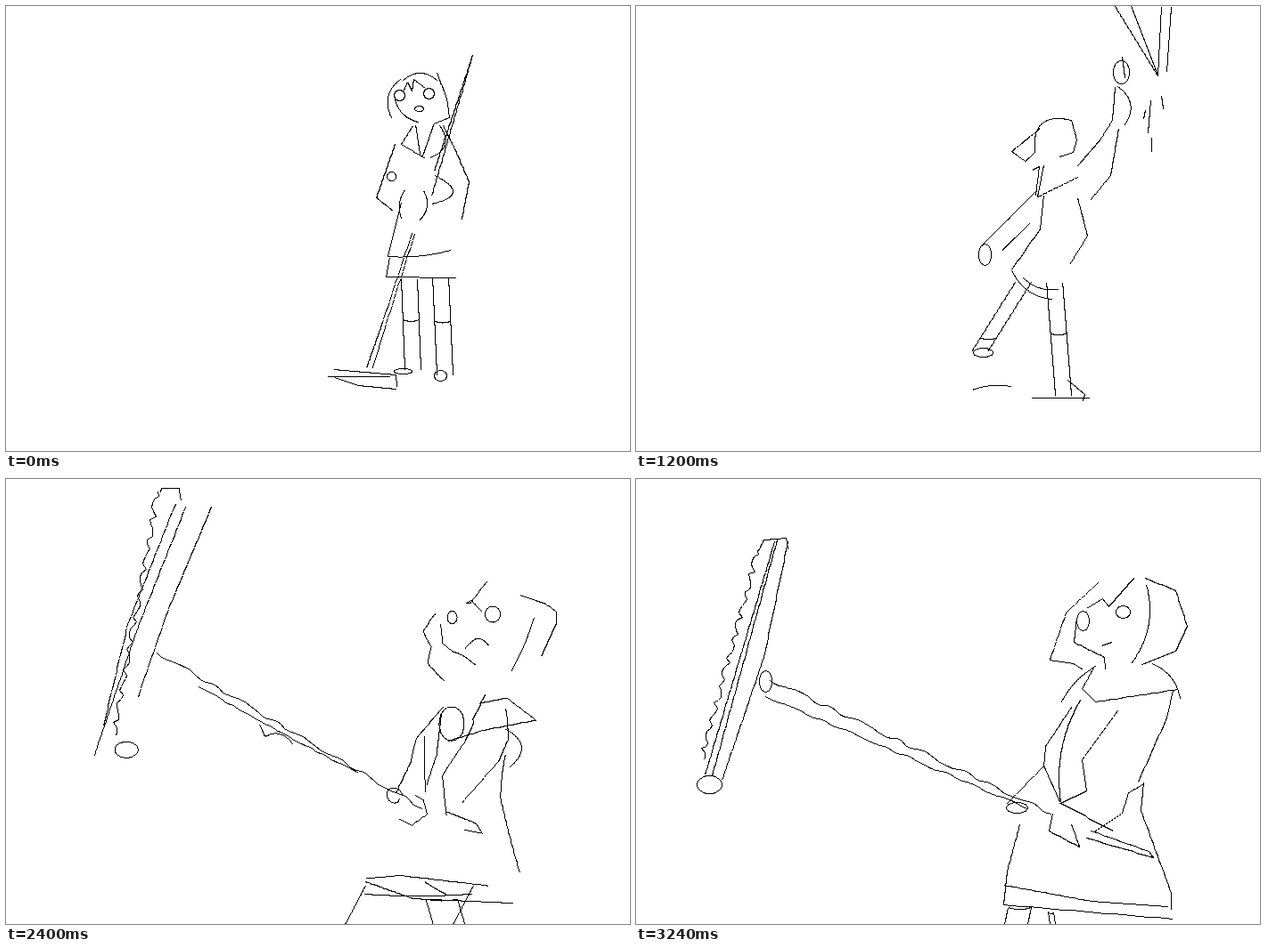
An HTML page for the animation above (3.36 s loop, 700x500 px).

```html
<!DOCTYPE html>
<html lang="en">
<head>
<meta charset="utf-8">
<title>Rake swing</title>
<style>
  html, body { margin: 0; width: 100%; height: 100%; overflow: hidden; background: #fff; }
  svg { display: block; width: 700px; height: 500px; }
  path { fill: none; stroke: #000; stroke-width: 1; shape-rendering: crispEdges; }
</style>
</head>
<body>
<svg viewBox="0 0 700 500"><path id="ink" transform="translate(.5 .5)"/></svg>
<script>
const LOOP = 3360, STEP = 120, MARK_REACH = 130;
const SEGMENTS = 60; // every stroke has the same number of points, so any two can blend

const mix = (a, b, k) => a + (b - a) * k;
const mixPoint = (p, q, k) => [mix(p[0], q[0], k), mix(p[1], q[1], k)];
const trace = at => Array.from({ length: SEGMENTS + 1 }, (_, i) => at(i / SEGMENTS, i));

function line(...xy) {
  const last = xy.length / 2 - 1;
  const point = i => [xy[2 * i], xy[2 * i + 1]];
  return trace(t => {
    const i = Math.min(last - 1, Math.floor(t * last));
    return mixPoint(point(i), point(i + 1), t * last - i);
  });
}

// Straight stroke pushed sideways by offset(t, i).
function pushed(ax, ay, bx, by, offset) {
  const length = Math.hypot(bx - ax, by - ay);
  return trace((t, i) => {
    const d = offset(t, i) / length;
    return [mix(ax, bx, t) + d * (by - ay), mix(ay, by, t) - d * (bx - ax)];
  });
}
const bow = (ax, ay, bx, by, bulge) => pushed(ax, ay, bx, by, t => bulge * 4 * t * (1 - t));
const wavy = (ax, ay, bx, by, size) => pushed(ax, ay, bx, by, (t, i) => size * Math.sin(i * 0.9 + Math.sin(i * 0.4)));
const teeth = (ax, ay, bx, by) => pushed(ax, ay, bx, by, (t, i) => 3 * Math.sin(i * 1.4 + Math.sin(i)) - 1);
const ring = (x, y, rx, ry = rx) => trace(t => [x + rx * Math.cos(t * 2 * Math.PI), y + ry * Math.sin(t * 2 * Math.PI)]);

function star(x, y, ...tips) {
  const outline = [];
  for (let i = 0; i < 8; i += 2) {
    const [ax, ay, bx, by] = [0, 1, 2, 3].map(k => tips[(i + k) % 8]);
    outline.push(ax, ay, x + 0.11 * (ax + bx - 2 * x), y + 0.11 * (ay + by - 2 * y));
  }
  return line(...outline, tips[0], tips[1]);
}

function leg(ax, ay, bx, by, width, knee = 0.45, bulge = 0) {
  const left = bow(ax, ay, bx, by, bulge);
  const [x, y] = left[Math.round(knee * SEGMENTS)];
  return [left, bow(ax + width, ay, bx + width, by, bulge), bow(x, y, x + width, y, -2)];
}

const resting = {
  hair: [bow(442, 82, 432, 125, -9), bow(444, 84, 484, 84, 9), line(483, 75, 494, 103, 497, 125, 479, 132), line(446, 94, 450, 85, 455, 95, 457, 82, 470, 92)],
  face: [bow(435, 99, 462, 130, -7), ring(441, 100, 6), ring(474, 98, 6), ring(463, 115, 5, 3)],
  body: [line(443, 220, 428, 280), line(459, 133, 464, 166), line(480, 131, 467, 168), line(456, 134, 443, 155, 470, 171), bow(486, 134, 475, 170, 12)],
  armL: [line(436, 155, 415, 215, 433, 229), ring(432, 191, 5)],
  armR: [line(490, 134, 503, 160, 519, 197, 511, 239), bow(481, 190, 477, 222, 22)],
  hands: [bow(447, 206, 443, 238, -4), bow(468, 207, 464, 240, 6)],
  skirt: [bow(427, 281, 498, 274, -3), line(430, 282, 426, 304, 504, 305)],
  legs: [...leg(443, 306, 447, 408, 18), ...leg(478, 304, 483, 414, 18), ring(445, 410, 10, 3), ring(487, 415, 7, 6)],
  pole: [line(458, 256, 425, 360, 411, 406), line(455, 255, 422, 355, 404, 406), line(477, 213, 523, 55), line(480, 185, 523, 55)],
  rake: [line(367, 408, 437, 414, 438, 427), line(360, 416, 430, 416), line(368, 417, 395, 426, 437, 430)]
};

const sweeping = {
  hair: [line(483, 121, 461, 137, 458, 150, 475, 157), bow(478, 118, 518, 111, 6), bow(528, 127, 527, 156, 5)],
  face: [line(477, 123, 480, 150, 503, 156), ring(487, 132, 5, 6), ring(516, 135, 3, 4)],
  body: [bow(472, 164, 481, 193, -5), line(484, 166, 488, 180, 497, 180), line(509, 166, 532, 168, 492, 197, 488, 178)],
  armL: [line(464, 186, 428, 218, 444, 244)],
  armR: [line(535, 173, 553, 228, 530, 247, 475, 253), bow(512, 190, 530, 212, -8)],
  hands: [ring(435, 246, 11, 8), ring(474, 230, 11, 12), ring(526, 205, 9, 5), line(472, 248, 480, 236, 512, 222, 486, 218)],
  skirt: [bow(483, 266, 448, 295, -7), line(448, 295, 530, 290), line(541, 270, 545, 285, 538, 308)],
  legs: [...leg(465, 297, 434, 398, 17, 0.4, -3), ...leg(521, 290, 483, 411, 14, 0.55, 8), ring(442, 398, 9, 4), ring(496, 408, 13, 5)],
  pole: [line(525, 209, 217, 343), line(445, 247, 213, 367), line(445, 243, 575, 201, 569, 192), line(383, 257, 225, 332)],
  rake: [line(244, 279, 195, 402), line(238, 283, 188, 395), teeth(237, 284, 184, 388), ring(221, 338, 7)],
  marks: [line(430, 434, 507, 438, 578, 411), line(544, 432, 593, 427), line(561, 240, 566, 227, 565, 243, 573, 236), line(250, 359, 247, 374)]
};

const lifting = {
  pole: [line(500, 180, 400, 20), line(508, 178, 409, 16), line(510, 190, 540, 230)],
  rake: [line(330, 60, 450, -30), line(325, 52, 445, -38)]
};

const reaching = {
  hair: [line(453, 137, 421, 163, 436, 174, 447, 164), bow(447, 164, 488, 128, 19), line(488, 128, 494, 150, 490, 164, 474, 169)],
  face: [],
  body: [line(457, 212, 453, 250, 421, 296), line(444, 184, 452, 180, 448, 212), line(457, 178, 450, 214, 495, 192), line(495, 215, 506, 258, 486, 290)],
  armL: [line(448, 208, 387, 269), line(441, 244, 410, 274)],
  armR: [line(494, 180, 520, 150, 534, 128, 537, 90), line(541, 137, 532, 190, 509, 218), bow(540, 90, 547, 134, 11)],
  hands: [ring(391, 279, 7, 12), ring(544, 74, 9, 13), line(545, 56, 548, 80)],
  skirt: [bow(421, 296, 466, 329, -8), bow(434, 305, 473, 318, -5)],
  legs: [...leg(425, 310, 376, 388, 18, 0.8), ...leg(460, 310, 470, 437, 18), ring(389, 389, 11, 5), line(484, 420, 503, 436, 501, 443)],
  pole: [line(585, 78, 537, 0), line(585, 78, 555, 0), line(595, 73, 600, 0), line(585, 78, 589, 0)],
  rake: [line(470, -40, 540, -50), line(480, -60, 560, -60)],
  marks: [line(443, 440, 508, 440), bow(377, 431, 420, 427, 3), line(577, 105, 574, 142), line(578, 147, 578, 163), line(569, 126, 571, 116), line(589, 100, 591, 115)]
};

const swinging = {
  hair: [bow(523, 188, 517, 142, 16), bow(517, 142, 563, 140, 9), line(537, 147, 579, 152, 582, 165, 577, 174), line(528, 148, 528, 165, 547, 157)],
  face: [ring(515, 172, 4, 5), ring(539, 171, 4, 5)],
  body: [line(505, 262, 498, 310, 484, 352)],
  armL: [line(512, 203, 478, 247, 501, 252), bow(505, 239, 533, 265, 8)],
  armR: [bow(570, 206, 570, 263, 17)],
  hands: [line(553, 255, 554, 248, 561, 249)],
  skirt: [line(488, 365, 520, 373, 578, 370), line(488, 380, 529, 380), line(576, 372, 600, 418, 637, 475, 637, 492)],
  legs: [...leg(480, 393, 450, 500, 24, 0.4), ...leg(553, 379, 592, 490, 24, 0.55)],
  pole: [bow(547, 260, 474, 40, -7), bow(525, 205, 623, 367, -13), bow(545, 255, 623, 362, -9), line(474, 40, 508, 0)],
  rake: [line(461, 0, 420, 85, 390, 245, 396, 308, 409, 327), line(498, 0, 428, 140, 410, 232, 419, 242)],
  marks: [bow(619, 262, 623, 367, 3), bow(631, 253, 617, 362, 6), line(617, 318, 612, 335, 609, 347), bow(477, 72, 453, 145, -6), line(480, 81, 471, 112), line(465, 184, 479, 180)]
};

const striking = {
  hair: [line(472, 171, 462, 192, 488, 205, 478, 220, 503, 235), line(526, 117, 508, 138, 555, 142), line(573, 138, 620, 152, 590, 190), line(606, 175, 582, 221)],
  face: [line(488, 158, 492, 188, 527, 206), ring(499, 154, 4, 7), ring(545, 152, 8), line(514, 186, 528, 177, 538, 179)],
  body: [bow(541, 323, 550, 383, -8)],
  armL: [line(494, 250, 454, 293, 458, 312, 442, 336), line(489, 258, 486, 305, 472, 326)],
  armR: [line(541, 222, 546, 232, 505, 290, 470, 352), line(546, 228, 563, 217, 581, 238, 573, 260, 505, 324), line(562, 284, 535, 310, 470, 350), bow(510, 234, 530, 228, 14)],
  hands: [line(430, 341, 430, 328, 438, 335), line(457, 332, 457, 360, 422, 386), ring(504, 361, 9, 13)],
  skirt: [line(400, 452, 433, 433, 548, 438), line(400, 452, 500, 462, 559, 458), line(518, 497, 580, 487), bow(553, 406, 572, 440, 7)],
  legs: [...leg(401, 422, 355, 500, 62, 0), ...leg(501, 433, 529, 500, 65, 0)],
  pole: [wavy(468, 355, 203, 174, 1.5), bow(350, 269, 300, 237, 4), line(468, 343, 515, 385), line(415, 326, 490, 370)],
  rake: [line(216, 0, 133, 125, 102, 208), line(259, 0, 175, 135, 100, 289), line(308, 0, 240, 95, 200, 157)],
  marks: [line(604, 426, 588, 466, 606, 452, 612, 472), line(589, 497, 605, 465), line(622, 466, 606, 500), line(270, 203, 273, 190, 275, 212), line(294, 129, 273, 157), line(308, 79, 255, 161), bow(204, 35, 164, 105, -4), line(549, 329, 549, 340)]
};

const shining = {
  hair: [bow(491, 130, 480, 218, -20), line(551, 113, 527, 147, 519, 133, 512, 155), line(578, 121, 605, 132, 623, 160, 610, 208), bow(578, 134, 550, 210, 4)],
  face: [line(486, 165, 488, 190, 524, 203, 526, 212), ring(501, 156, 7), ring(546, 151, 9, 10), bow(516, 193, 543, 193, 13)],
  body: [line(578, 297, 571, 360, 602, 500), ring(508, 236, 14, 19), line(540, 213, 570, 207, 603, 232, 545, 243, 505, 255), bow(568, 242, 573, 285, 16)],
  armL: [line(485, 262, 458, 300, 432, 368), line(487, 268, 471, 360), line(467, 297, 468, 360)],
  armR: [line(533, 262, 502, 310, 502, 330, 482, 360, 517, 404), line(574, 285, 517, 403)],
  hands: [ring(437, 377, 14, 15), line(458, 377, 478, 374, 487, 392, 470, 404, 458, 377)],
  skirt: [line(405, 445, 450, 457, 533, 475), line(406, 452, 412, 480, 577, 494), bow(420, 407, 405, 445, -3)],
  legs: [...leg(404, 492, 400, 510, 180, 1), ...leg(440, 510, 440, 540, 6, 0)],
  pole: [wavy(465, 384, 135, 215, 2), wavy(440, 390, 133, 228, 1), line(517, 403, 570, 416, 568, 424, 510, 402), ring(145, 226, 8, 12)],
  rake: [line(163, 56, 116, 345), line(143, 62, 97, 332), line(152, 62, 95, 332), teeth(138, 56, 89, 330), line(140, 56, 142, 52, 161, 52, 163, 65), ring(102, 346, 13, 9)],
  marks: [star(72, 124, 44, 99, 84, 99, 100, 136, 51, 150), star(319, 138, 325, 79, 340, 136, 318, 200, 267, 150), star(402, 231, 398, 197, 425, 225, 407, 258, 376, 243), star(157, 398, 146, 356, 230, 350, 181, 446, 91, 443)]
};

const posing = {
  hair: [line(518, 116, 482, 150, 464, 203, 490, 207, 500, 213), line(558, 111, 530, 143, 523, 134, 505, 145), line(571, 111, 605, 125, 618, 165, 605, 193, 567, 208), bow(572, 118, 555, 207, 11)],
  face: [line(494, 155, 491, 183, 525, 200, 526, 213), ring(501, 159, 7, 11), ring(546, 149, 8, 7), line(522, 187, 533, 183)],
  body: [line(569, 340, 566, 372, 600, 465, 600, 483), bow(515, 210, 477, 250, -4), line(513, 212, 500, 235, 515, 250, 607, 236), bow(578, 207, 610, 246, 7), line(602, 237, 595, 268, 563, 340)],
  armL: [line(488, 256, 459, 300, 457, 322, 415, 365), bow(498, 248, 476, 362, -10), line(457, 322, 475, 362)],
  armR: [line(540, 260, 500, 315, 505, 350, 476, 364, 535, 395), line(568, 343, 552, 352, 545, 375, 515, 395)],
  hands: [ring(427, 369, 12, 6), line(467, 375, 463, 395, 497, 413, 488, 387)],
  skirt: [line(413, 456, 510, 474, 596, 480), line(430, 388, 416, 440, 412, 478, 602, 494)],
  legs: [...leg(417, 481, 413, 500, 26, 0), ...leg(462, 486, 464, 500, 6, 0)],
  pole: [wavy(466, 376, 150, 225, 2), wavy(440, 370, 145, 244, 1), line(510, 395, 575, 418, 580, 425, 505, 403), ring(145, 227, 7, 12)],
  rake: [line(170, 70, 143, 200, 96, 338), line(158, 68, 85, 333), line(155, 70, 77, 332), teeth(137, 80, 74, 315), line(137, 80, 143, 68, 168, 66, 170, 78), ring(82, 343, 14, 10)]
};

const score = [
  [0, resting], [480, sweeping], [840, lifting], [1200, reaching],
  [1680, swinging], [2160, striking], [2640, shining], [3240, posing]
];

function center(strokes) {
  const points = strokes.flat();
  return [0, 1].map(axis => points.reduce((sum, p) => sum + p[axis], 0) / points.length);
}

const tracks = [...Object.keys(resting), 'marks'].map(name => ({
  name,
  keys: score.filter(([, pose]) => pose[name]).map(([time, pose]) => ({ time, strokes: pose[name] }))
}));

// Paired strokes blend; spare ones travel with the part of the nearer key.
function between(a, b, k) {
  const paired = Math.min(a.strokes.length, b.strokes.length);
  const blended = a.strokes.slice(0, paired)
    .map((stroke, i) => stroke.map((p, j) => mixPoint(p, b.strokes[i][j], k)));
  const near = (k < 0.5 ? a : b).strokes;
  if (!paired || near.length === paired) return blended.concat(near.slice(paired));
  const home = center(near), middle = mixPoint(center(a.strokes), center(b.strokes), k);
  return blended.concat(near.slice(paired).map(stroke => stroke.map(
    p => [p[0] + middle[0] - home[0], p[1] + middle[1] - home[1]])));
}

function strokesAt({ name, keys }, time) {
  if (name === 'marks') {
    const key = keys.find(key => Math.abs(key.time - time) < MARK_REACH);
    return key ? key.strokes : [];
  }
  const exact = keys.find(key => key.time === time);
  if (exact) return exact.strokes;
  const next = keys.findIndex(key => key.time > time);
  const a = keys[next - 1], b = keys[next];
  return between(a, b, (time - a.time) / (b.time - a.time));
}

const ink = document.getElementById('ink');
let shown = -1;

function draw(now) {
  const time = Math.floor((now % LOOP) / STEP) * STEP;
  if (time === shown) return;
  shown = time;
  ink.setAttribute('d', tracks.flatMap(track => strokesAt(track, time))
    .map(stroke => 'M' + stroke.map(p => p.map(Math.round).join(' ')).join('L')).join(''));
}

const start = performance.now();
function tick() {
  draw(performance.now() - start);
  requestAnimationFrame(tick);
}
tick();
</script>
</body>
</html>
```
